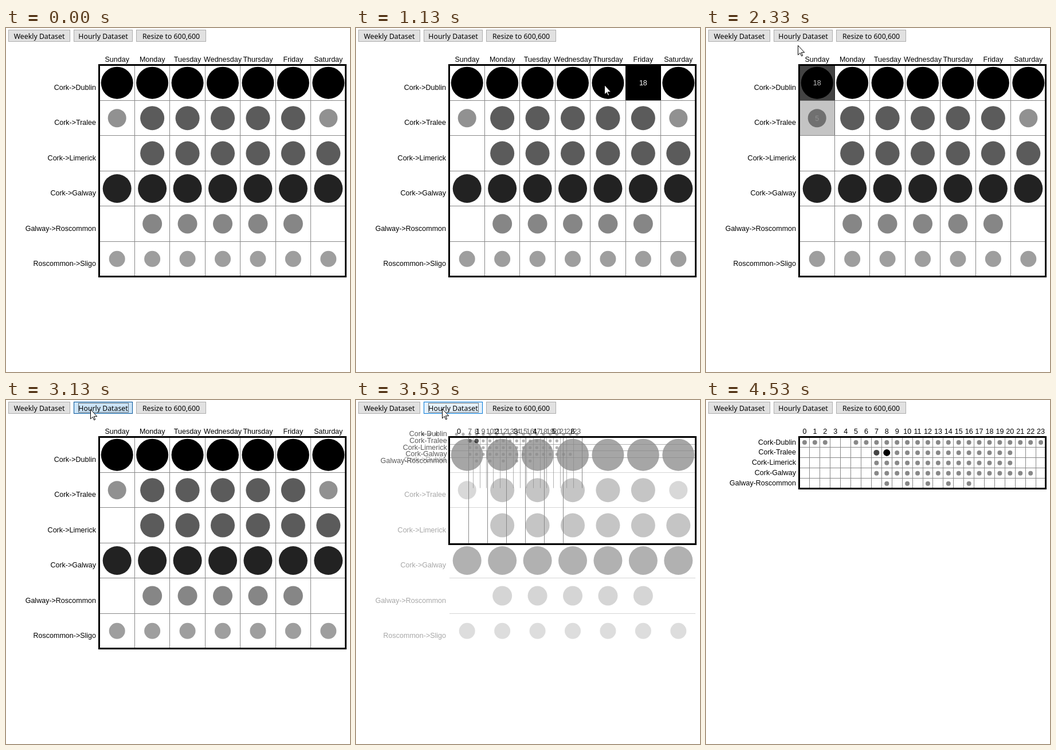
Write an HTML page with a canvas that moves like this. It is 600x600 px and loops after 4860 ms.

```html
<!DOCTYPE html>
<html lang="en">
<head>
<meta charset="utf-8">
<title>Timetable matrix</title>
<style>
html, body { margin: 0; width: 100%; height: 100%; overflow: hidden; background: #fff; }
canvas { display: block; }
</style>
</head>
<body>
<canvas id="stage" width="600" height="600"></canvas>
<script>
const ctx = document.getElementById('stage').getContext('2d');
const LOOP = 4860, FPS = 15, FADE = 250;
const SWAP = 3255, SWAP_TIME = 500;
const LEFT = 163, TOP = 65, WIDTH = 430;
const ENTER = { x: 14, y: 33 };   // where new parts fly in from
const LABEL_FONT = '12.5px "Liberation Sans", Arial, sans-serif';
const BUTTON_FONT = '12.3px "Noto Sans", sans-serif';

// level: radius, grey, value
const LEVELS = {
  a: [28, 0, 18], b: [25, 34, 15], c: [21, 91, 10],
  d: [17, 134, 6], e: [16, 145, 5], f: [14, 158, 4],
  x: [4, 136, 1], y: [5, 68, 2], z: [6, 0, 3]
};

const makeSet = (cols, rows) => ({ cols, rows, cell: WIDTH / cols.length });

const week = makeSet(
  ['Sunday', 'Monday', 'Tuesday', 'Wednesday', 'Thursday', 'Friday', 'Saturday'],
  [
    ['Cork->Dublin', 'aaaaaaa'],
    ['Cork->Tralee', 'eccccce'],
    ['Cork->Limerick', ' cccccc'],
    ['Cork->Galway', 'bbbbbbb'],
    ['Galway->Roscommon', ' ddddd '],
    ['Roscommon->Sligo', 'fffffff']
  ]);

const pad = n => ' '.repeat(n), dots = n => 'x'.repeat(n);
const hours = makeSet(
  Array.from({ length: 24 }, (_, i) => String(i)),
  [
    ['Cork-Dublin', 'xxx  ' + dots(19)],
    ['Cork-Tralee', pad(7) + 'yz' + dots(12)],
    ['Cork-Limerick', pad(7) + dots(14)],
    ['Cork-Galway', pad(7) + dots(16)],
    ['Galway-Roscommon', pad(8) + 'x x x x x']
  ]);

// set, row, column, time in, time out
const hovers = [
  [week, 0, 6, 600, 640], [week, 0, 5, 635, 1130],
  [week, 0, 4, 1130, 1150], [week, 0, 0, 1165, 1620],
  [week, 1, 0, 1620, 2180], [week, 0, 0, 2184, 2340],
  [hours, 0, 22, 3745, 3865]
];

// time, x, y of the pointer
const path = [
  [600, 548, 88], [667, 506, 96], [733, 498, 98], [1067, 498, 98],
  [1133, 434, 99], [1200, 205, 97], [1267, 195, 96], [1533, 195, 96],
  [1667, 196, 150], [1733, 196, 152], [2067, 196, 152], [2133, 192, 140],
  [2200, 185, 110], [2267, 172, 68], [2333, 160, 30], [2400, 152, 18],
  [2467, 150, 15], [2667, 150, 15], [2867, 147, 16], [3267, 147, 16],
  [3400, 150, 15], [3600, 150, 15], [3667, 225, 25], [3733, 566, 68]
];

const lerp = (a, b, p) => a + (b - a) * p;
const crisp = v => Math.floor(v) + 0.5;
const grey = v => `rgb(${v},${v},${v})`;
function ease(t) {
  t = Math.min(1, Math.max(0, t));
  return t < 0.5 ? 4 * t ** 3 : 1 - 4 * (1 - t) ** 3;
}

function text(str, x, y, align, color = '#000', font = LABEL_FONT) {
  ctx.font = font;
  ctx.textAlign = align;
  ctx.fillStyle = color;
  ctx.fillText(str, x, y);
}

function line(x1, y1, x2, y2) {
  ctx.lineWidth = 1;
  ctx.strokeStyle = '#888';
  ctx.beginPath();
  ctx.moveTo(x1, y1);
  ctx.lineTo(x2, y2);
  ctx.stroke();
}

// k runs from 0 (at the entry point) to 1 (in place)
function drawRows(set, k, alpha) {
  ctx.globalAlpha = alpha;
  const { cell, rows } = set;
  const entering = k < 1;
  for (let i = 1; i < rows.length; i++) {
    const y = crisp(lerp(ENTER.y, TOP + cell * i, k));
    line(LEFT, y, LEFT + WIDTH - 1, y);
  }
  rows.forEach(([label, pattern], row) => {
    [...pattern].forEach((key, col) => {
      if (key === ' ') return;
      const [r, shade] = LEVELS[key];
      ctx.fillStyle = grey(shade);
      ctx.beginPath();
      ctx.arc(lerp(ENTER.x, LEFT + cell * (col + 0.5), k),
              lerp(ENTER.y, TOP + cell * (row + 0.5), k), r * k, 0, 7);
      ctx.fill();
    });
    const baseline = TOP + cell * (row + 0.7);
    text(label, lerp(162, 157, k), entering ? lerp(ENTER.y + 4, baseline, k) : baseline, 'right');
  });
  ctx.globalAlpha = 1;
}

// The first seven columns are kept and slide; the others fly in.
function drawColumns(p, height) {
  const kept = week.cols.length;
  const names = p > 0 ? hours.cols : week.cols;
  names.forEach((name, i) => {
    const isKept = i < kept;
    const place = n => lerp(isKept ? LEFT + week.cell * n : ENTER.x, LEFT + hours.cell * n, p);
    ctx.globalAlpha = isKept ? 1 : p;
    text(name, place(i + 0.5), 59, 'center');
    if (i === names.length - 1) return;
    const x = crisp(place(i + 1));
    const bottom = i < kept - 1 ? TOP + height : TOP + hours.cell * hours.rows.length;
    line(x, TOP, x, bottom - 1);
  });
  ctx.globalAlpha = 1;
}

function drawHover([set, row, col, start, end], t) {
  const rise = ease((Math.min(t, end) - start) / FADE);
  const alpha = rise * (1 - ease((t - end) / FADE));
  if (alpha <= 0) return;
  const { cell } = set;
  const x = LEFT + cell * col, y = TOP + cell * row;
  const x0 = Math.floor(x), y0 = Math.floor(y);
  ctx.globalAlpha = alpha;
  ctx.fillStyle = '#000';
  ctx.fillRect(x0, y0, Math.floor(x + cell) + 1 - x0, Math.floor(y + cell) - y0);
  text(LEVELS[set.rows[row][1][col]][2], x + cell / 2, y + cell / 2 + 4.5, 'center', '#fff');
  ctx.globalAlpha = 1;
}

function drawButton(label, x, width, fill = '#e1e1e1', border = '#adadad', weight = 1) {
  ctx.fillStyle = fill;
  ctx.fillRect(x, 3, width, 21);
  ctx.strokeStyle = border;
  ctx.lineWidth = weight;
  ctx.strokeRect(x + weight / 2, 3 + weight / 2, width - weight, 21 - weight);
  text(label, x + width / 2, 19, 'center', '#000', BUTTON_FONT);
}

function drawButtons(t) {
  let look = [];
  if (t >= 3130 && t < 3266) look = ['#cce4f7', '#005499'];
  else if (t >= 2399 && t < 3660) look = ['#e5f1fb', '#0078d7'];
  else if (t >= 3660 && t < 4530) look = ['#e1e1e1', '#0078d7', 2];
  drawButton('Weekly Dataset', 4, 108);
  drawButton('Hourly Dataset', 118, 103, ...look);
  drawButton('Resize to 600,600', 227, 122);
  if (t >= 3130 && t < 4530) {
    ctx.setLineDash([1, 1]);
    ctx.lineWidth = 1;
    ctx.strokeStyle = '#000';
    ctx.strokeRect(126.5, 5.5, 87, 16);
    ctx.setLineDash([]);
  }
}

const arrow = new Path2D('M0 0V16.5L3.7 13L6.2 18.5L8.2 17.6L5.8 12.2H11.3Z');
function drawPointer(t) {
  if (t < 599 || t > 3790) return;
  const next = path.findIndex(key => key[0] > t);
  const b = next < 0 ? path[path.length - 1] : path[next];
  const a = next > 0 ? path[next - 1] : b;
  const p = a === b ? 0 : (t - a[0]) / (b[0] - a[0]);
  ctx.save();
  ctx.translate(Math.round(lerp(a[1], b[1], p)) + 0.5, Math.round(lerp(a[2], b[2], p)) + 0.5);
  ctx.fillStyle = '#fff';
  ctx.strokeStyle = '#000';
  ctx.lineWidth = 1;
  ctx.fill(arrow);
  ctx.stroke(arrow);
  ctx.restore();
}

function draw(now) {
  // The picture steps at a fixed rate.
  const t = Math.floor((now % LOOP + 4) * FPS / 1000) * 1000 / FPS;
  const p = ease((t - SWAP) / SWAP_TIME);
  const height = lerp(week.cell * week.rows.length, hours.cell * hours.rows.length, p);

  ctx.fillStyle = '#fff';
  ctx.fillRect(0, 0, 600, 600);
  drawButtons(t);
  if (p < 1) drawRows(week, 1, 1 - p);
  if (p > 0) drawRows(hours, p, p);
  drawColumns(p, height);
  hovers.forEach(hover => drawHover(hover, t));
  ctx.strokeStyle = '#000';
  ctx.lineWidth = 3;
  ctx.strokeRect(LEFT - 0.5, TOP - 0.5, WIDTH, Math.round(height));
  drawPointer(t);
}

const begin = performance.now();
function tick() {
  draw(performance.now() - begin);
  requestAnimationFrame(tick);
}
tick();
</script>
</body>
</html>
```
